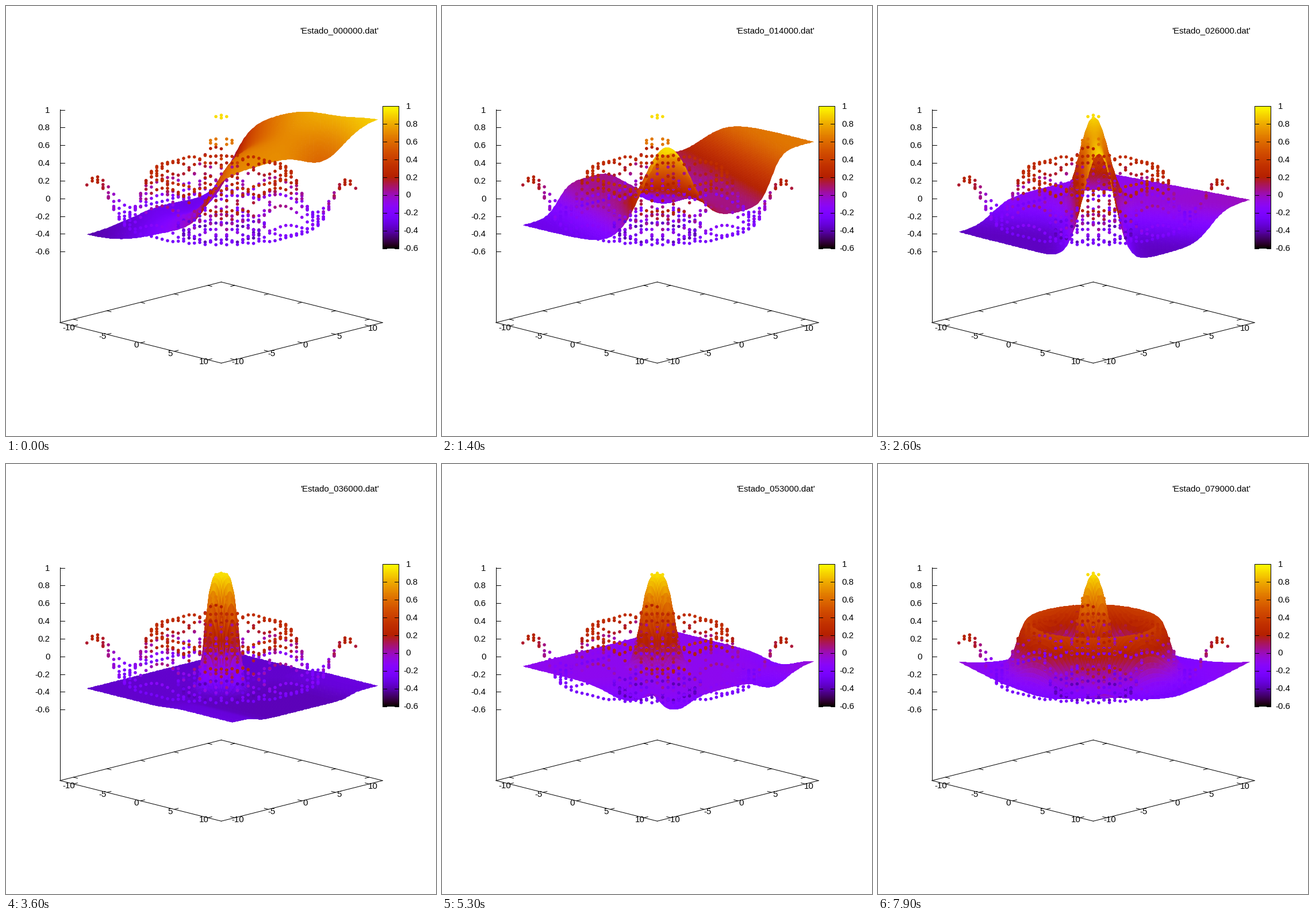
These frames come from a looping animation (748 by 748 pixels, 8 s). A matplotlib script:

```python
import numpy as np
import matplotlib.pyplot as plt
from matplotlib.animation import FuncAnimation
from matplotlib.colors import ListedColormap

SIZE, DPI, FRAMES, STEP_MS = 748, 100, 80, 100
PX = 72 / DPI
LO, HI, N = -10, 11.6, 109
BASE = -1.402

plt.rcParams["font.family"] = "Liberation Sans"


def project(x, y, z):
    return 374 + 11.69 * (x + y), 334 - 154.2 * z + 2.94 * (x - y)


def bessel0(r):
    angles = (np.arange(60) + 0.5) * np.pi / 60
    return np.mean([np.cos(r * np.sin(a)) for a in angles], axis=0)


def step(p):
    return 1 / (1 + np.exp(-p))


def bell(p):
    return np.exp(-p ** 2)


axis = np.linspace(LO, HI, N)
X, Y = np.meshgrid(axis, axis, indexing="ij")
U, V = X + Y, X - Y  # across the screen, towards the viewer
R = np.hypot(X, Y)


def ridge(height, lean, width, start, fade):
    return (height * bell((U - lean * V) / width)
            * bell(np.minimum(V - start, 0) / fade))


def tower(height, width, power):
    return height * np.exp(-(R * np.sqrt(2) / width) ** power)


def dent(cx, cy, width, height):
    return height * bell(np.hypot(X - cx, Y - cy) / width)


def tilted():
    front = step(V / 4)
    rise = 0.7 * step((U + 0.09 * V) / 1.4) + 0.62 * step((U - 7) / 4)
    bulge = 0.33 * bell((U + 1) / 8) - 0.3 * bell((U - 15.5) / 4.5)
    return -0.41 + rise + front * bulge + 0.1 * bell((U + 9) / 6)


def arch():
    low = 0.36 * step(-(Y + 0.31 * X + 7.9) / 0.8)
    high = 0.58 * step((Y + 0.38 * X - 9.7) / 0.8)
    valley = 0.3 * bell((Y + 0.38 * X - 2.8) / 2.5) * step(-X / 2)
    return 0.06 - low + high - valley + ridge(0.9, 0.07, 5, 20, 11)


def tunnel():
    slope = (0.31 + 0.005 * X) * step((Y - 0.5 * X) / 1.2)
    crest = 1.12 + 0.008 * np.maximum(V, 0)
    return -0.38 + slope + ridge(crest, 0.04, 3.2, 0, 4.5)


def plain():
    ends = step((-6.5 - Y) / 0.6) + step((Y - 7.5) / 0.6)
    return (-0.36 + 0.03 * step((X - 2) / 0.7) * (2 * ends - 1)
            + tower(1.3, 2.75, 4))


def skirt():
    dents = (dent(5, -11, 3.5, -0.1) + dent(9, -10, 1.5, 0.09)
             + dent(12, -8.5, 2.5, -0.1) + dent(11, 5.5, 2.5, -0.12)
             + dent(6.5, 11.6, 3, -0.07) + dent(12, 12, 3, 0.06))
    return -0.11 + dents + tower(1.04, 2.9, 3)


def crater(corner, depth, spread):
    mid, half = (LO + HI) / 2, (HI - LO) / 2
    near = V / (HI - LO)
    sag = 1 - np.abs((X - mid) * (Y - mid) / half ** 2) ** 1.5
    outside = corner + 0.05 * near + (depth - 0.09 * near) * sag
    mix = step((7.8 - R) / 0.6)
    rim = 0.24 * bell((R - 7.5) / spread)
    return mix * 0.93 * bessel0(R) + (1 - mix) * outside + rim


STATES = [tilted(), arch(), tunnel(), plain(), skirt(),
          crater(0.05, -0.13, 2.1), crater(-0.06, -0.16, 1.6)]
TIMES = [0, 14, 26, 36, 53, 63, 79]
EASE = [1, 1, 1, 4, 1, 1]


def surface(i):
    k = min(np.searchsorted(TIMES, i, side="right") - 1, len(EASE) - 1)
    w = ((i - TIMES[k]) / (TIMES[k + 1] - TIMES[k])) ** EASE[k]
    return STATES[k] * (1 - w) + STATES[k + 1] * w


g = np.linspace(0, 1, 256)
cmap = ListedColormap(np.column_stack(
    [np.sqrt(g), g ** 3, np.clip(np.sin(2 * np.pi * g), 0, 1)]))
SHADE = dict(cmap=cmap, vmin=-0.6, vmax=1)

fig = plt.figure(figsize=(SIZE / DPI, SIZE / DPI), dpi=DPI, facecolor="white")
ax = fig.add_axes([0, 0, 1, 1])


def line(xs, ys):
    ax.plot(xs, ys, color="black", lw=PX, zorder=5)


def label(x, y, text, ha="center"):
    return ax.text(x, y, text, ha=ha, va="baseline", fontsize=15 * PX,
                   color="black", zorder=6)


def floor_line(a, b):
    xs, ys = zip(project(*a, BASE), project(*b, BASE))
    line(xs, ys)


def draw_axes():
    box = [(-12, -12), (12, -12), (12, 12), (-12, 12)]
    for a, b in zip(box, box[1:] + box[:1]):
        floor_line(a, b)
    for n, v in enumerate(range(-10, 11, 5)):
        for edge, inner in ((-12, -11.4), (12, 11.4)):
            floor_line((v, edge), (v, inner))
            floor_line((edge, v), (inner, v))
        label(109 + 58.8 * n, 564 + 14.7 * n, str(v))
        label(402.5 + 58.8 * n, 623 - 14.7 * n, str(v))

    line([94, 94], [180, 550])
    line([655, 683, 683, 655, 655], [174, 174, 421, 421, 174])
    for z in np.arange(-6, 11, 2) / 10:
        y = 334.3 - 154.2 * z
        line([94, 102], [y, y])
        label(76, y + 5, f"{z:g}", "right")
        y = 328.4 - 154.4 * z
        line([655, 662], [y, y])
        line([676, 683], [y, y])
        label(691 if z < 0 else 695, y + 4.5, f"{z:g}", "left")


ax.imshow(np.linspace(1, -0.6, 247)[:, None], extent=(655, 683, 421, 174),
          aspect="auto", interpolation="nearest", zorder=1, **SHADE)
ax.set(xlim=(-0.5, SIZE - 0.5), ylim=(SIZE - 0.5, -0.5))
ax.axis("off")
draw_axes()

# Sampled Bessel function that the surface learns
px, py = np.meshgrid(-10 + 0.8 * np.arange(27), -10 + 0.8 * np.arange(25),
                     indexing="ij")
pz = bessel0(np.hypot(px, py))
dot_x, dot_y = project(px, py, pz)
ax.scatter(dot_x.ravel(), dot_y.ravel(), c=pz.ravel(), s=(5.6 * PX) ** 2,
           linewidths=0, zorder=4, **SHADE)

title = label(648, 46.5, "", "right")
mesh = None


def update(i):
    global mesh
    if mesh is not None:
        mesh.remove()
    z = surface(i)
    sx, sy = project(X, Y, z)
    mean = (z[1:, 1:] + z[1:, :-1] + z[:-1, 1:] + z[:-1, :-1]) / 4
    # Reversed y makes the cells run from back to front
    mesh = ax.pcolormesh(sx[:, ::-1], sy[:, ::-1], mean[:, ::-1],
                         shading="flat", edgecolors="face", linewidth=0.6 * PX,
                         antialiased=True, zorder=3, **SHADE)
    title.set_text(f"'Estado_{i * 1000:06d}.dat'")
    return mesh, title


anim = FuncAnimation(fig, update, frames=FRAMES, interval=STEP_MS,
                     init_func=lambda: [], repeat=True, repeat_delay=0)
plt.show()
```
